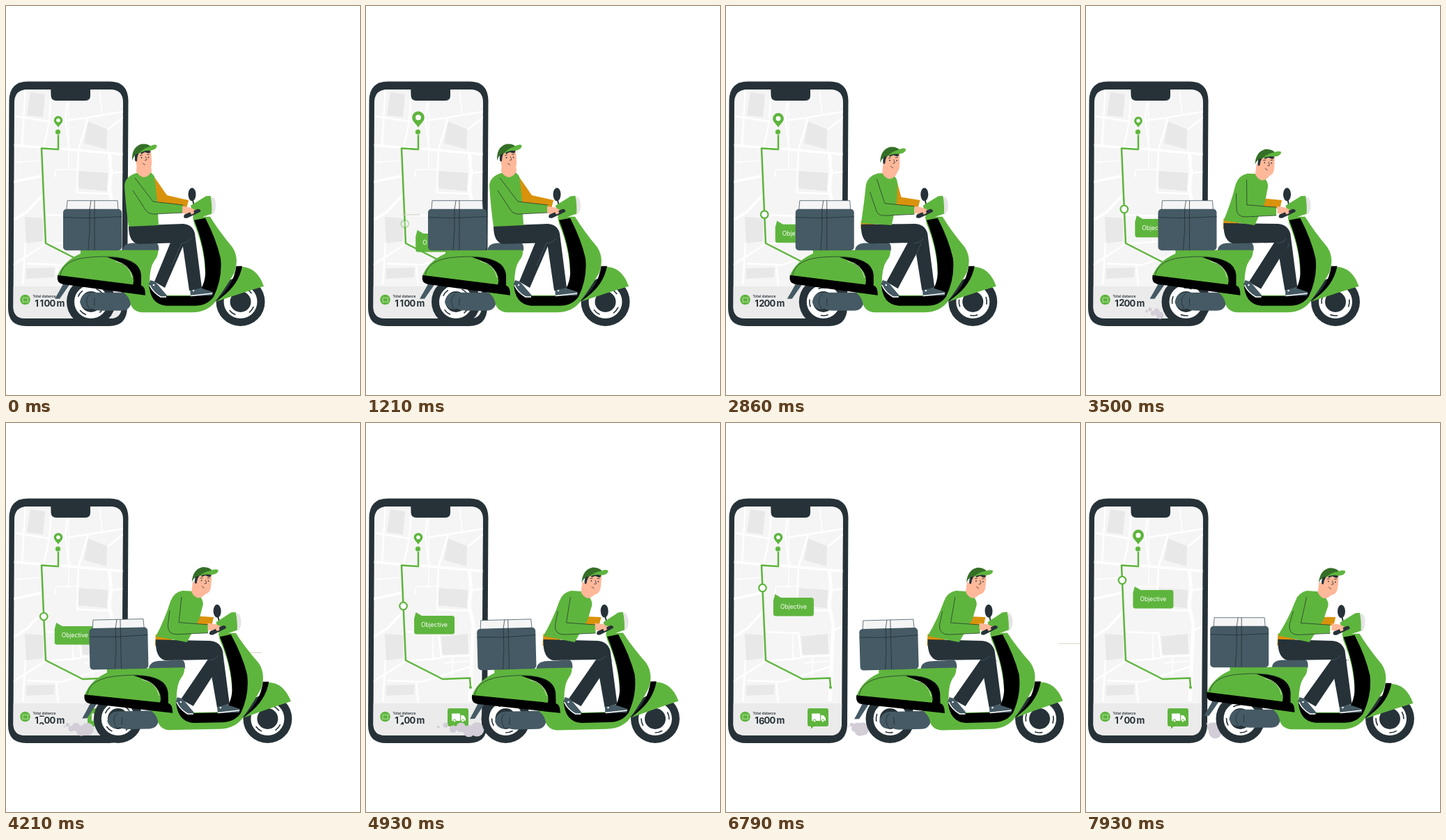
An HTML page that plays this animation: 508x559 px, repeating every 8000 ms.

```html
<!DOCTYPE html>
<html lang="en">
<head>
<meta charset="utf-8">
<title>Delivery</title>
<style>
html, body { margin: 0; width: 100%; height: 100%; overflow: hidden; background: #fff; }
svg { display: block; width: 100%; height: 100%; }
text { font-family: Inter, "Open Sans", sans-serif; }
.g { fill: #5eb53d; } .d { fill: #263238; } .s { fill: #455a64; }
.w { fill: #fff; } .o { fill: #d9920c; } .k { fill: #ffb899; } .p { fill: #f5f5f5; }
.route { fill: none; stroke: #5eb53d; stroke-width: 2.5; stroke-linejoin: round; }
.ink { fill: none; stroke: #1d2a30; stroke-width: .7; }
.road { fill: none; stroke: #fff; }
.num { font-weight: 700; font-size: 13px; text-anchor: middle; fill: #263238; }
</style>
</head>
<body>
<svg viewBox="0 0 508 559">
  <defs>
    <clipPath id="screenClip"><path id="screen" d="M31 120H150Q168 120 168 139L166 431Q166 449 149 449H28Q10 449 10.500 431L12 139Q12 120 31 120Z"/></clipPath>
    <clipPath id="rollClip"><rect x="46" y="420.500" width="11" height="13"/></clipPath>
    <g id="wheel">
      <circle class="d" r="35"/><circle class="w" r="24"/><circle class="d" r="15"/>
    </g>
  </defs>

  <g id="phone">
    <path class="d" d="M31 108.500H149Q175 108.500 175.500 136L174 434Q173 460 148 460H29Q3 460 3 434L4.500 136Q5 108.500 31 108.500Z"/>
    <use href="#screen" class="p"/>
    <g clip-path="url(#screenClip)">
      <g fill="#e8e8e8">
        <path d="M35 124L56 127L53 160L30 157ZM118 166L145 177L144 206L112 197ZM104 237L146 240L145 266L103 262ZM27 303L53 305L53 338L29 341ZM108 307L146 303L147 332L110 333ZM29 377L70 376L69 390L29 392Z"/>
      </g>
      <g class="road">
        <path stroke-width="3.500" d="M10 200L90 206L168 213M10 253L52 244M10 308L30 296L54 270"/>
        <path stroke-width="5" d="M148 210L151 240L148 262L154 290L149 400"/>
        <path stroke-width="2.500" d="M28 118L23 200M12 158L62 166L65 120M62 166L54 204M88 136L85 162L91 207M85 165L118 160L168 152M146 178L168 160M118 160L104 206M104 207L102 268L150 270M54 300L104 302L108 336L150 334M10 372L57 342M57 342L108 338M28 340L24 400M72 372L75 402M30 370L80 372L150 350M150 240L168 238M150 300L168 292"/>
        <path stroke-width="1.500" d="M90 136V236M70 246L72 235H104M124 336V366M112 345L146 342M96 302V342M134 120L138 156M12 225L50 222"/>
      </g>
      <path d="M5 403H170V452H5Z" fill="#ebebeb"/>
    </g>
    <path class="d" d="M64 109H121V129Q121 136 114 136H72Q65 136 64.500 129Z"/>
    <path class="route" d="M75 181V206L51 204.500L57 341L110 368L149 366.500L150 380"/>
    <circle class="g" cx="150" cy="380" r="2"/>
    <circle class="g" cx="74.500" cy="181" r="4" stroke="#dff0d8"/>
    <g id="pin"><path class="g" d="M0 0C-2-4-6.300-6-6.300-10.300A6.300 6.300 0 0 1 6.300-10.300C6.300-6 2-4 0 0Z"/><circle class="w" cy="-10.300" r="2.800"/></g>
    <circle class="g" cx="27.500" cy="422" r="7.300"/>
    <path d="M24 419.500L26 419L29 419.500L31.500 419V425L29 425.500L26 425L24 425.500Z" fill="none" stroke="#d5efc8" stroke-width=".7"/>
    <text x="38.500" y="419" font-size="5" fill="#263238" stroke="#263238" stroke-width=".1">Total distance</text>
    <g class="num"><text x="44" y="431.500">1</text><text x="59" y="431.500">0</text><text x="67" y="431.500">0</text><text x="78.500" y="431.500">m</text></g>
    <g clip-path="url(#rollClip)"><g id="roll" class="num"></g></g>
    <path class="g" d="M120 410H144Q147 410 147 413V433Q147 436 144 436H126L122 439.500V436H120Q117 436 117 433V413Q117 410 120 410Z"/>
    <path class="w" d="M123 417.500H135V428H123ZM136 420H140L143 424V428H136Z"/>
    <g class="w" stroke="#5eb53d"><circle cx="127" cy="428" r="2"/><circle cx="139" cy="428" r="2"/></g>
    <g id="tip">
      <path class="g" d="M18 9L26.500 14H70Q73.500 14 73.500 17.500V37Q73.500 40.500 70 40.500H19Q15.500 40.500 15.500 37V18Z"/>
      <text id="label" x="25.500" y="30" font-size="8.500" fill="#fff"></text>
    </g>
    <circle id="spot" r="5.300" fill="#fff" stroke="#5eb53d" stroke-width="2.200"/>
  </g>

  <g id="lines" stroke="#d3d1bf" stroke-width="1.200"></g>
  <g id="smoke" fill="#d2cdd6"></g>

  <g id="scooter">
    <g class="body">
      <path class="s" d="M83 397L91 400L77 420L70 420Q76 410 83 397Z"/>
    </g>
    <g transform="translate(122 425)"><use href="#wheel"/><g class="spin"></g></g>
    <g transform="translate(336.500 425)"><use href="#wheel"/><g class="spin"></g></g>

    <g class="body">
      <path class="s" d="M120 411H172Q181 413 180 424Q178 437 166 437H136Q128 437 124 434Q110 438 106 425Q108 412 120 411Z"/>
      <path class="ink" d="M121 413Q111 420 119 434M127 419V430"/>
      <path class="s" d="M167 351Q168 341 180 340L215 339Q220 341 219 351Z"/>
      <path class="g" d="M74 387Q82 366 107 355V350H218Q219 358 213 365Q206 375 206 397Q210 414 228 415H270Q285 410 286 390Q286 350 270 312L268 302L293 302Q305 322 325 346Q335 362 328 382Q318 400 302 422Q290 440 265 439.500L195 439.500Q180 438 178 424Q175 412 158 405Z"/>
      <path d="M270 307L286 304Q302 335 308 362Q311 390 298 417Q288 431 268 430L230 430Q206 428 205 397Q212 416 230 416H268Q284 408 286 385Q287 350 270 307Z"/>
      <path class="g" d="M302 424Q330 402 337 374Q360 374 370 402Q340 411 302 424Z"/>
      <path d="M299 424Q326 404 330.500 373H339Q334 400 309 418Z"/>
      <path d="M145 360Q192 360 194 386V404L182 401Q190 375 145 360Z"/>
      <path class="ink" d="M78 386Q82 362 125 360Q180 356 190 378"/>
      <path d="M157 366Q178 370 181 390" fill="none" stroke="#d8eccc" stroke-width=".8"/>
      <path d="M74 386L194 401Q200 402 200 415L81 399Q72 397 74 386Z"/>
      <g id="box">
        <path class="p" stroke="#455a64" stroke-width=".8" d="M88 279H160L161 292H87Z"/>
        <path class="ink" d="M122 279L120 292M127 279V292"/>
        <rect class="s" x="82" y="291" width="84" height="59.500" rx="5"/>
        <path class="ink" d="M82 303L119 304L166 302M120 291V322L118 350M127 291V350"/>
      </g>
    </g>

    <path id="backLeg" class="d"/>
    <path class="s" d="M207 394L214 396L231 416L229 419H222Q208 410 205 400Z"/>
    <path d="M206 401Q211 412 222 418H230" fill="none" stroke="#fff" stroke-width="1.500"/>
    <path class="s" d="M264 406L279 405L297 411L296 416L265 417Z"/>
    <path d="M265 416.500L296 413" stroke="#fff" stroke-width="1.500"/>
    <g class="w"><circle cx="212" cy="401" r="1.300"/><circle cx="269" cy="409" r="1.300"/></g>
    <path id="hem" class="o"/>
    <path id="frontLeg" class="d"/>
    <path id="crease" fill="none" stroke="#53646c" stroke-width=".6"/>

    <path id="farArm" class="o"/>
    <path id="torso" class="g"/>
    <path id="neck" class="k"/>
    <g id="head">
      <path class="k" d="M187 208L186 222Q187 235 201 237Q210 235 209 222L208 207Z"/>
      <path class="d" d="M184 210H191L188.500 217L188 223Q184 225 185 216ZM192 207L207 206Q208 212 204 211.500L199 210L194 213Z"/>
      <path fill="#356f27" d="M181 222Q180 203 194 198.500Q204 197 209 203L190 212Q184 213 181 222Z"/>
      <path class="g" d="M190 213Q196 205 206 202Q212 198 216.500 200Q217 206 207 208Q198 207 190 213Z"/>
      <path class="ink" d="M192 215L196 214M202 213.500L206 213M200 216L202 221L199 222M196 226L200 228.500"/>
      <g class="d"><circle cx="194.500" cy="218" r=".9"/><circle cx="204.500" cy="217.500" r=".9"/></g>
    </g>
    <path id="arm" class="g"/>
    <path id="seam" class="ink"/>

    <g class="body">
      <path class="ink" d="M268 278L271 292" style="stroke-width:1.800"/>
      <ellipse class="d" cx="267" cy="270" rx="5.500" ry="9.500"/>
      <ellipse cx="295.500" cy="286" rx="5.500" ry="12.500" fill="#e4e4e4"/>
      <path class="g" d="M265 286L287 272.500L293.500 272Q296 286 295 298L270 306Z"/>
      <path class="k" d="M253 287L265 289L273 293Q272 301 262 299L253 297Z"/>
      <path class="d" d="M256 299L275 291Q280 291 279 295L260 304Q253 305 256 299Z"/>
      <path class="k" d="M262 290Q270 291 270 297L266 299L264 295Z"/>
    </g>
  </g>
</svg>
<script>
const NS = 'http://www.w3.org/2000/svg', LOOP = 8;
const $ = id => document.getElementById(id);
const each = (sel, fn) => document.querySelectorAll(sel).forEach(fn);
const set = (el, attrs) => { for (const k in attrs) el.setAttribute(k, attrs[k]); return el; };
const add = (parent, tag, attrs) => parent.appendChild(set(document.createElementNS(NS, tag), attrs));
const clamp = (v, lo = 0, hi = 1) => Math.min(hi, Math.max(lo, v));

// Smooth curve through [time, value] keys, flat at turning points.
function track(keys, t) {
  const n = keys.length - 1;
  if (t <= keys[0][0]) return keys[0][1];
  if (t >= keys[n][0]) return keys[n][1];
  const i = keys.findIndex(k => k[0] > t) - 1;
  const rate = j => (keys[j + 1][1] - keys[j][1]) / (keys[j + 1][0] - keys[j][0]);
  const slope = j => {
    if (j === 0) return rate(0);
    if (j === n) return rate(n - 1);
    const a = rate(j - 1), b = rate(j);
    return a * b <= 0 ? 0 : 2 * a * b / (a + b);
  };
  const h = keys[i + 1][0] - keys[i][0], u = (t - keys[i][0]) / h;
  const a = keys[i][1], b = keys[i + 1][1];
  return a + (b - a) * u * u * (3 - 2 * u)
    + h * u * (1 - u) * ((1 - u) * (slope(i) - rate(i)) - u * (slope(i + 1) - rate(i)))
    + (b - a) * u * (1 - u) * (1 - 2 * u);
}

// Blend two paths that share the same commands.
function mix(a, b, u) {
  const to = b.match(/[\d.]+/g);
  let i = 0;
  return a.replace(/[\d.]+/g, v => (+v + (to[i++] - v) * u).toFixed(2));
}

const pinKeys = [[0, 16.3], [.89, 25], [1.21, 23], [1.71, 20.5], [2.2, 17.8], [2.65, 21.5], [3.5, 15.3], [4.3, 16.5], [7.5, 16.5], [7.71, 18], [7.93, 21], [8, 21.6]];
const spotKeys = [[0, 319], [1.21, 313], [2.29, 305], [3.5, 292], [4.93, 263], [6.79, 237], [7.93, 226], [8, 225.5]];
const digitKeys = [[0, 1], [1.7, 1], [2.29, 1.38], [3, 2], [3.5, 2], [4.93, 3.5], [6.79, 5.9], [7.93, 7.33], [8, 7.42]];
const leanKeys = [[0, 0], [1.21, 0], [2.29, .15], [3.5, .8], [4.93, 1], [6.79, 1.01], [7.93, 1.07], [8, 1.07]];
const tiltKeys = [[0, 0], [3.5, 0], [4.4, 1], [6.79, 1.1], [7.93, 0], [8, 0]];
const boxKeys = [[0, 0], [3.5, 0], [4.93, 1.3], [6.79, -1.5], [7.93, -3.3], [8, -3.3]];
const slowKeys = [[0, 0], [1.21, 7], [2.29, 14.3], [3.5, 21.5]];
const backKeys = [[6, 114.5], [6.79, 113.5], [7.71, 105.5], [7.93, 99.5], [8, 97.5]];

function rideX(t) {
  if (t < 3.5) return track(slowKeys, t);
  if (t < 6) return 21.5 + 93 * Math.sin((t - 3.5) / 2.5 * Math.PI / 2) ** 2;
  return track(backKeys, t);
}

// Upright and leaning shapes of the rider.
const poses = {
  torso: ['M176 317Q172 290 170 258Q171 245 187 240L206 238Q214 242 214 252L217 280L219 315Z',
          'M176 306Q190 282 199 256Q204 243 216 241L232 242Q246 250 246 261L240 282L221 315Z'],
  hem: ['M176 314L190 314L200 320L176 320Z', 'M176 303L200 310L200 320L175 320Z'],
  neck: ['M188 222L187 238Q198 254 209 238L208 228Z', 'M232 228L230 243Q238 258 249 247L252 238Z'],
  farArm: ['M213 246L231 272L262 279L259 291L214 281Z', 'M246 262L237 278L259 279L256 291L233 291Z'],
  arm: ['M180 258L201 294Q205 299 213 299L254 297L254 286L211 281L187 247Z',
        'M202 250L193 290Q192 304 206 304L251 302L251 290L211 287L216 252Z'],
  seam: ['M185 247L211 281L254 286M182 265L201 294Q205 299 213 299L254 297',
         'M215 250L209 287L251 290M197 270L193 290Q192 304 206 304L251 302'],
  backLeg: ['M236 340L258 336L228 405L213 396Z', 'M253 338L274 340L230 407L212 397Z'],
  frontLeg: ['M176 316L254 313Q268 314 271 327L281 405L263 409L253 340L190 342Q176 340 176 316Z',
             'M176 311L254 313Q268 314 272 327L282 404L264 408L252 340L190 341Q175 338 176 311Z'],
  crease: ['M252 341Q262 340 265 334M252 341L238 373', 'M252 341Q262 340 266 334M274 341L275 343']
};

// Entry time, height and vanishing point of each passing streak.
const streaks = [[.71, 300, 52], [4, 330, 20], [5.8, 300, 20], [6.76, 317, 34]]
  .map(([start, y, end]) => ({ start, end, el: add($('lines'), 'line', { y1: y, y2: y }) }));
const puffs = Array.from({ length: 6 }, () => add($('smoke'), 'circle', {}));
for (let i = 0; i < 10; i++) add($('roll'), 'text', { x: 51.3, y: 431.5 + 18 * i }).textContent = i;
each('.spin', g => add(g, 'circle', { r: 20, fill: 'none', stroke: '#263238', 'stroke-width': 1.6, 'stroke-dasharray': '11 20.416' }));

function drawPhone(t) {
  const y = track(spotKeys, t), x = 51 + 6 * (y - 204) / 137;
  set($('pin'), { transform: `translate(75 174.5) scale(${track(pinKeys, t) / 16.5})` });
  set($('roll'), { transform: `translate(0 ${-18 * track(digitKeys, t)})` });
  set($('spot'), { cx: x, cy: y, opacity: clamp((t - .85) / 1.1) });
  const grow = clamp((t - .4) / .6);
  set($('tip'), { transform: `translate(${x + 18 * (1 - grow)} ${y + 9 * (1 - grow)}) scale(${grow})` });
  $('label').textContent = 'Objective'.slice(0, clamp(Math.floor((t - 1.05) / .13), 0, 9));
}

function drawAir(t) {
  for (const { start, end, el } of streaks) {
    const x = 508 - (t - start) * 1000, tail = x + 70;
    set(el, { x1: Math.max(x, end), x2: Math.max(tail, end), opacity: t >= start && tail > end ? 1 : 0 });
  }
  puffs.forEach((el, i) => {
    const age = (t * 1.3 + i / 6) % 1, born = t - age / 1.3;
    const size = clamp((t - 2.7) / 1.6);
    set(el, {
      cx: rideX(born) + 86 - 24 * age,
      cy: 443 - 9 * age + (i % 2 ? 2 : -2),
      r: born < 2.9 ? 0 : (10 * (1 - age) + 1) * size
    });
  });
}

function drawRide(t) {
  const lean = track(leanKeys, t);
  set($('scooter'), { transform: `translate(${rideX(t)} 0)` });
  each('.body', g => set(g, { transform: `translate(0 .7) rotate(${-1.4 * track(tiltKeys, t)} 245 400)` }));
  set($('box'), { transform: `translate(${track(boxKeys, t)} 0)` });
  each('.spin', g => set(g, { transform: `rotate(${20 + t * 300})` }));
  for (const id in poses) set($(id), { d: mix(...poses[id], lean) });
  set($('head'), { transform: `translate(${48 * lean} ${9 * lean}) rotate(${8 * lean} 196 235)` });
}

function frame(now) {
  const t = now / 1000 % LOOP;
  drawPhone(t);
  drawAir(t);
  drawRide(t);
  requestAnimationFrame(frame);
}
frame(0);
</script>
</body>
</html>
```
